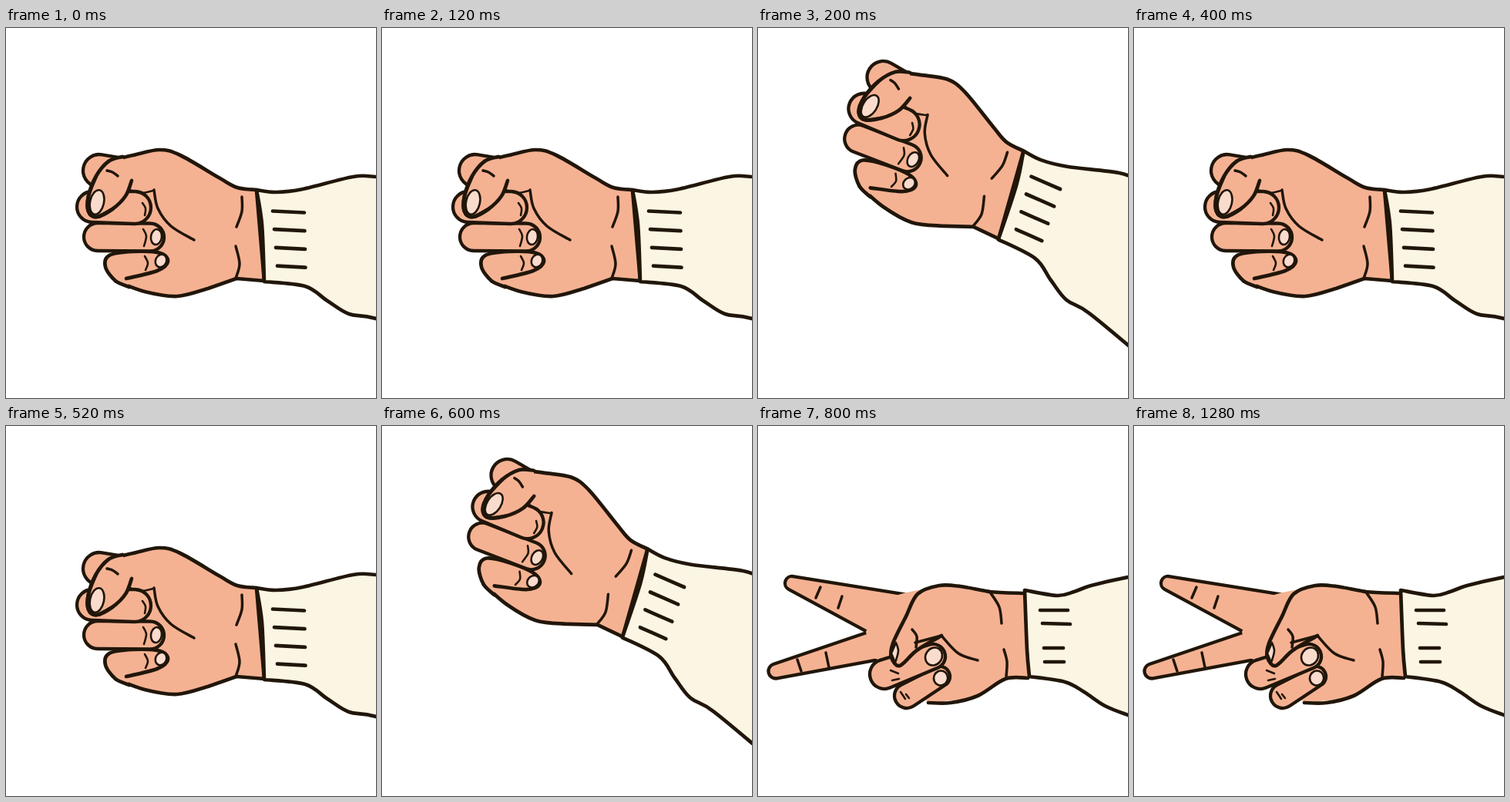
These frames come from a looping animation (480x480 px, 1.6 s). An HTML page:

```html
<!DOCTYPE html>
<html lang="en">
<head>
<meta charset="utf-8">
<title>Rock paper scissors hand</title>
<style>
  html, body { margin: 0; width: 100%; height: 100%; overflow: hidden; background: #fff; }
  svg { display: block; width: 100%; height: 100%; }
  path, ellipse { stroke: #21160a; stroke-linecap: round; stroke-linejoin: round; }
  .bare { stroke: none; }
</style>
</head>
<body>
<svg viewBox="0 0 480 480">
  <g id="fist"></g>
  <g id="scissors"></g>
</svg>
<script>
const SKIN = '#f5b293', WOOL = '#fbf5e3', NAIL = '#f9dccd';
const OUTER = 4.7, INNER = 3.5, THIN = 2.6;
const LOOP = 1600, BEAT = 200;
const fist = document.getElementById('fist');
const scissors = document.getElementById('scissors');

function add(group, tag, attrs) {
  const el = document.createElementNS('http://www.w3.org/2000/svg', tag);
  for (const key in attrs) el.setAttribute(key, attrs[key]);
  group.appendChild(el);
}

// Smooth path through key points; "|" marks a sharp corner.
function spline(text) {
  return text.split('|').map((run, n) => {
    const p = run.trim().split(/\s+/).map(s => s.split(',').map(Number));
    let d = (n ? 'L' : 'M') + p[0];
    for (let i = 0; i < p.length - 1; i++) {
      const a = p[i - 1] || p[i], b = p[i], c = p[i + 1], e = p[i + 2] || c;
      const c1 = [0, 1].map(k => b[k] + (c[k] - a[k]) / 6);
      const c2 = [0, 1].map(k => c[k] - (e[k] - b[k]) / 6);
      d += 'C' + [c1, c2, c].join(' ');
    }
    return d;
  }).join('');
}

function shape(group, points, fill, width = OUTER, style = '') {
  add(group, 'path', { d: spline(points), fill, 'stroke-width': width, class: style });
}

function lines(group, width, ...list) {
  list.forEach(points => shape(group, points, 'none', width));
}

// Tapered finger: the tangents of two circles, closed by a second arc unless open.
function finger(group, x1, y1, r1, x2, y2, r2, open = false) {
  const axis = Math.atan2(y2 - y1, x2 - x1);
  const spread = Math.acos((r1 - r2) / Math.hypot(x2 - x1, y2 - y1));
  const on = (x, y, r, side) => {
    const angle = axis + side * spread;
    return [x + r * Math.cos(angle), y + r * Math.sin(angle)];
  };
  const arc = (r, large, to) => `A${r} ${r} 0 ${+large} 0 ${to}`;
  const start = on(x2, y2, r2, -1);
  let d = `M${start}L${on(x1, y1, r1, -1)}${arc(r1, r1 > r2, on(x1, y1, r1, 1))}L${on(x2, y2, r2, 1)}`;
  if (!open) d += arc(r2, r2 > r1, start) + 'Z';
  add(group, 'path', { d, fill: SKIN, 'stroke-width': OUTER - .4 });
}

function nail(group, cx, cy, rx, ry, turn) {
  add(group, 'ellipse', {
    cx, cy, rx, ry, fill: NAIL, 'stroke-width': THIN, transform: `rotate(${turn} ${cx} ${cy})`
  });
}

function rib(group, x, y, length, rise) {
  lines(group, OUTER, `${x},${y} ${x + length},${y + rise}`);
}

function drawFist(g) {
  shape(g, '132,173 165,165 199,158 226,165 276,194 300,207 325,210' +
    '| 335,328 299,325 | 262,338 222,348 180,342 142,328', SKIN);

  // folded fingers, bottom to top
  shape(g, '160,336 142,328 129,310 134,295 165,290 200,292 210,303 196,315 156,325', SKIN);
  finger(g, 119, 271, 18, 187, 271.5, 18);
  finger(g, 121, 185, 21, 145, 190, 22, true);
  finger(g, 112, 232, 20, 167, 233, 21);
  nail(g, 195, 271, 7, 10, 8);
  nail(g, 201, 302, 7, 8.5, 25);

  // thumb
  shape(g, '151,167 133,173 117,192 107,218 107,238 118,245 138,235 155,218 163,198', SKIN);
  nail(g, 118, 226, 9, 16, 12);
  lines(g, OUTER, '117,192 107,218 107,238 118,245 138,235');

  // creases
  lines(g, INNER, '131,185 138,187 145,192', '192,210 197,234 214,257 244,275',
    '306,219 306,238 299,258', '298,283 303,306 298,325');
  lines(g, THIN, '160,210 175,214 191,211', '177,227 181,234 180,243',
    '178,261 182,270 179,283', '180,296 184,305 181,314');

  // the sleeve runs past the stage edge so it still reaches it when raised
  shape(g, '560,199 480,193 450,193 385,209 350,213 325,210' +
    '| 325,210 332,255 335,329 | 335,329 388,335 417,354 445,371 480,377 570,408', WOOL);
  for (let i = 0; i < 4; i++) rib(g, 346 + 2 * i, 237.5 + 23.7 * i, 41 - 1.5 * i, 2);
}

function drawScissors(g) {
  // two stretched fingers
  finger(g, 44, 204, 9, 197, 256, 36, true);
  finger(g, 23, 318, 9.5, 150, 285, 19, true);
  shape(g, '140,267 165,226 240,210 346,217 | 350,327 321,328 280,351 221,359 | 160,303 148,298 140,267',
    SKIN, 0, 'bare');
  lines(g, INNER, '81,209 75,223', '109,221 104,236', '51,303 56,318', '88,294 92,313');

  // palm and wrist
  lines(g, OUTER, '221,359 250,359 285,350 321,328 350,327', '262,208 300,215 346,217');

  // curled fingers
  finger(g, 193, 350, 16, 236, 325, 13);
  nail(g, 237, 327, 9, 9.5, 20);
  finger(g, 164, 322, 19, 227, 299, 16);
  nail(g, 228, 299, 10.5, 12, 35);
  lines(g, THIN, '172,317 182,321', '174,330 183,328', '185,345 191,354', '192,348 196,353');

  // thumb and its fold
  shape(g, '300,215 262,208 235,207 207,218 192,247 175,282 173,300 184,311 206,291 238,272', SKIN);
  shape(g, '179,281 182,292 178,307 | 173,295 179,281', NAIL, THIN);
  lines(g, INNER, '238,272 260,295 285,304', '200,264 206,273 205,287', '204,281 238,272',
    '302,217 313,235 316,256', '319,290 323,306 322,325');

  // sleeve
  shape(g, '500,194 480,196 432,207 410,215 388,220 346,213' +
    '| 346,213 349,290 352,325 | 352,325 398,332 423,345 450,363 480,375 500,381', WOOL);
  for (const i of [0, 1]) {
    rib(g, 366 + 3 * i, 239 + 17 * i, 36, i);
    rib(g, 371 + i, 288 + 18 * i, 25, 0);
  }
}

// Two shakes of the fist, then the throw is held for half the loop.
function render(ms) {
  const beat = Math.floor((ms % LOOP) / BEAT);
  const thrown = beat >= 4;
  const raised = beat % 2 === 1;
  fist.style.display = thrown ? 'none' : '';
  scissors.style.display = thrown ? '' : 'none';
  fist.setAttribute('transform',
    raised ? 'translate(344.5 159.5) rotate(20.7) translate(-325 -210)' : '');
}

drawFist(fist);
drawScissors(scissors);
const start = performance.now();
function tick() {
  render(performance.now() - start);
  requestAnimationFrame(tick);
}
tick();
</script>
</body>
</html>
```
